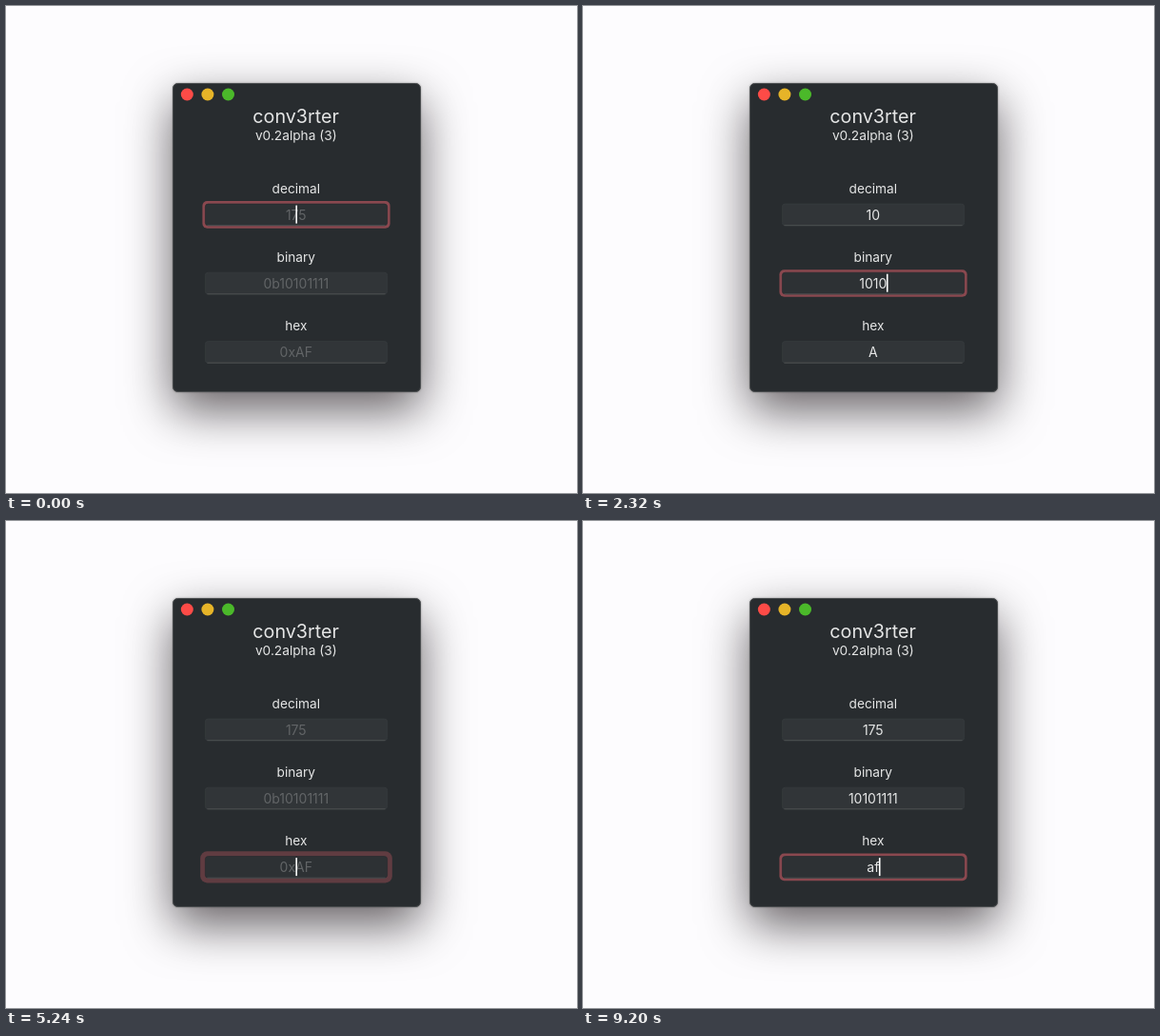
Recreate the animation shown at these times as an HTML page. Size 600 by 512 pixels, loop 9400 ms.

```html
<!DOCTYPE html>
<html lang="en">
<head>
<meta charset="utf-8">
<title>conv3rter</title>
<style>
  html, body { margin: 0; width: 100%; height: 100%; overflow: hidden; background: #fdfcfe; }
  .stage { position: relative; width: 600px; height: 512px; overflow: hidden; }
  .window {
    position: absolute; left: 174.5px; top: 80.5px; width: 261px; height: 325.5px;
    box-sizing: border-box; border: 1.5px solid #484b4d; border-radius: 5.5px;
    background: #282c2f;
    box-shadow: 0 0 2px rgba(0, 0, 0, .4), 0 19px 50px rgba(8, 2, 7, .62);
  }
  svg { position: absolute; inset: 0; }
  text { font-family: Inter, Roboto, sans-serif; font-size: 13.7px; fill: #e5e6e6; text-anchor: middle; }
  .title { font-size: 19.7px; }
  .value { font-size: 14px; }
  .placeholder { fill: #626567; }
  .ring { fill: #8a484f; }
  .box { fill: #313538; stroke: #373b3e; stroke-width: .8; }
  .focused .box { fill: #2d3134; stroke: #2a2d30; }
  .edge { stroke: #4d5052; stroke-width: 1; }
  .caret { fill: #fff; }
</style>
</head>
<body>
<div class="stage">
  <div class="window"></div>
  <svg id="scene" width="600" height="512" viewBox="0 0 600 512">
    <circle cx="190.3" cy="93" r="6.5" fill="#fd4b47"/>
    <circle cx="211.9" cy="93" r="6.5" fill="#e6b428"/>
    <circle cx="233.5" cy="93" r="6.5" fill="#4bb92a"/>
    <text class="title" x="304.6" y="123">conv3rter</text>
    <text x="304.8" y="141.3">v0.2alpha (3)</text>
  </svg>
</div>
<script>
const LOOP = 9400, STEP = 40, CENTER = 304.8;
const LEFT = 209.4, WIDTH = 191.2, HEIGHT = 22.6;
const RING_WIDE = 12, RING_REST = 3;

// [time, text] typed into the focused field; the other two show the conversion
const typing = [
  [0, ''], [480, '1'], [640, '17'], [800, '175'], [1480, ''],
  [2040, '1'], [2080, '10'], [2240, '101'], [2320, '1010'], [2640, '10101'],
  [2800, '101011'], [2960, '1010111'], [3080, '10101111'], [3880, ''],
  [5880, 'A'], [6080, 'Af'], [7160, 'A'], [7400, 'AF'], [7560, 'A'], [7680, ''],
  [7840, 'a'], [7960, 'aF'], [8640, 'a'], [9080, 'af']
];
// [time, field index, ring growth at that moment, settling time]
const focusing = [[0, 0, RING_REST, 0], [1840, 1, RING_WIDE, 160], [5200, 2, 7.5, 80]];
const caretOff = [[1280, 1480], [3520, 3880], [4400, 4800], [5520, 5880], [6520, 6960], [8400, 8640]];

const scene = document.getElementById('scene');

function add(parent, tag, attrs, content = '') {
  const node = document.createElementNS('http://www.w3.org/2000/svg', tag);
  set(node, attrs);
  node.textContent = content;
  return parent.appendChild(node);
}

function set(node, attrs) {
  for (const name in attrs) node.setAttribute(name, attrs[name]);
}

function makeField(label, base, hint, top) {
  const group = add(scene, 'g', {});
  const ring = add(group, 'rect', { class: 'ring' });
  add(group, 'rect', { class: 'box', x: LEFT, y: top, width: WIDTH, height: HEIGHT, rx: 3 });
  add(group, 'path', { class: 'edge', d: `M${LEFT + 2} ${top + HEIGHT}h${WIDTH - 4}` });
  add(group, 'text', { x: CENTER, y: top - 11.5 }, label);
  const value = add(group, 'text', { x: CENTER, y: top + 16.6 });
  const caret = add(group, 'rect', { class: 'caret', y: top + 1.5, width: 1.6, height: 19 });
  return { group, ring, value, caret, base, hint, top };
}

const fields = [
  makeField('decimal', 10, '175', 208.1),
  makeField('binary', 2, '0b10101111', 280.2),
  makeField('hex', 16, '0xAF', 352.6)
];

const latest = (events, t) => events.filter(e => e[0] <= t).pop();

function placeRing(field, growth) {
  const progress = (RING_WIDE - growth) / (RING_WIDE - RING_REST);
  set(field.ring, {
    x: LEFT - growth, y: field.top - growth,
    width: WIDTH + 2 * growth, height: HEIGHT + 2 * growth,
    rx: growth + 2, opacity: 0.17 + 0.83 * progress ** 2.5
  });
}

function draw(t) {
  const [start, active, from, duration] = latest(focusing, t);
  const text = latest(typing, t)[1];
  const number = parseInt(text, fields[active].base);
  const blinkedOff = caretOff.some(([a, b]) => t >= a && t < b);

  fields.forEach((field, i) => {
    const focused = i === active;
    const shown = focused ? text : number.toString(field.base).toUpperCase();
    field.group.setAttribute('class', focused ? 'focused' : '');
    field.value.textContent = text ? shown : field.hint;
    field.value.setAttribute('class', text ? 'value' : 'value placeholder');
    field.ring.style.display = focused ? '' : 'none';
    field.caret.style.display = focused && !blinkedOff ? '' : 'none';
    if (!focused) return;
    const settled = duration ? Math.min(1, (t - start) / duration) : 1;
    placeRing(field, from + (RING_REST - from) * settled);
    const offset = text ? field.value.getComputedTextLength() / 2 : 0;
    field.caret.setAttribute('x', CENTER + offset - 0.4);
  });
}

function tick() {
  const t = performance.now() % LOOP;
  draw(Math.floor(t / STEP) * STEP);
  requestAnimationFrame(tick);
}
tick();
</script>
</body>
</html>
```
